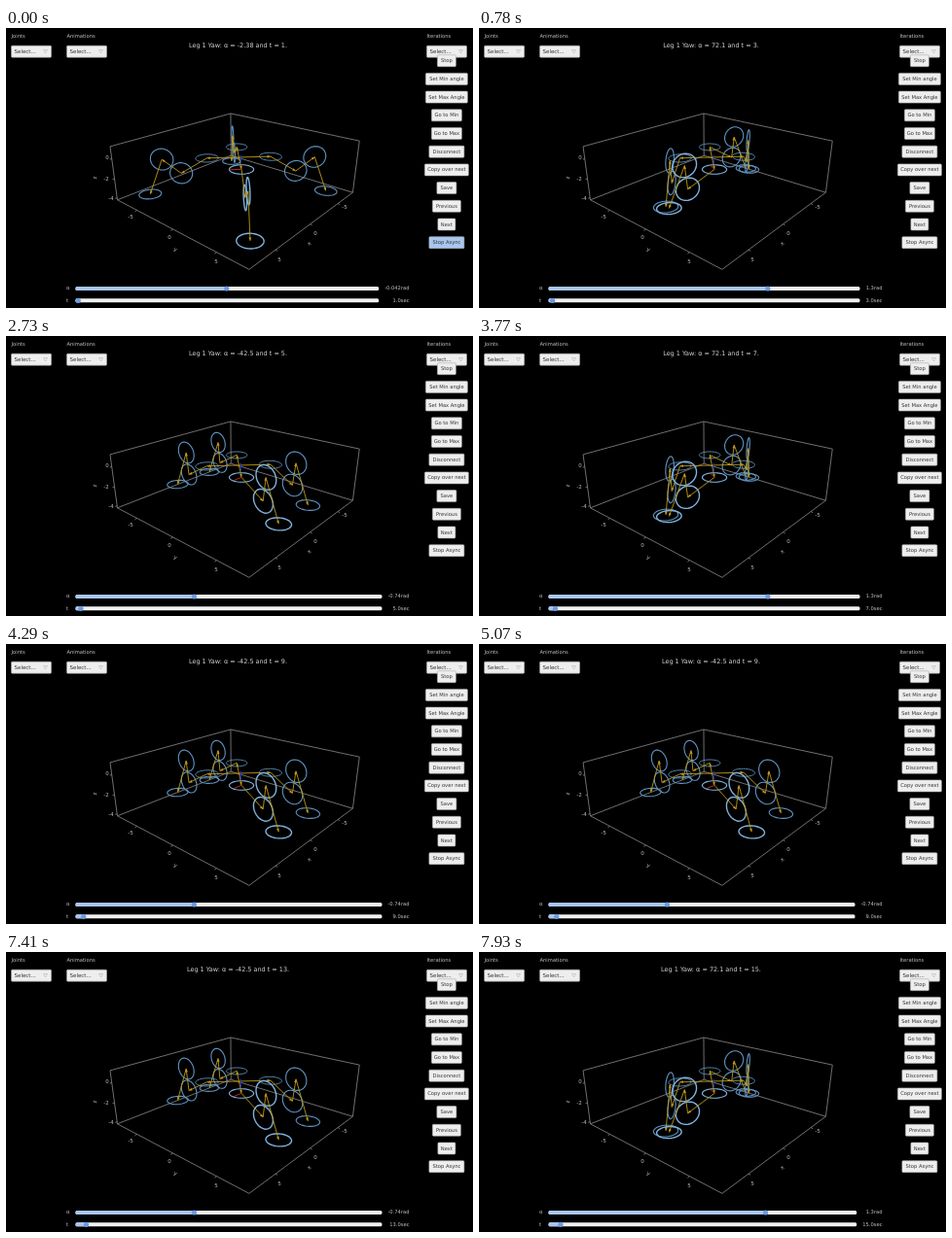
An HTML page with a canvas that plays this animation: 480x288 px, repeating every 8 s.

```html
<!DOCTYPE html>
<html>
<head>
<meta charset="utf-8">
<style>
html, body { margin: 0; width: 100%; height: 100%; overflow: hidden; background: #000; }
canvas { display: block; width: 480px; height: 288px; }
</style>
</head>
<body>
<canvas id="stage"></canvas>
<script>
const canvas = document.getElementById('stage');
const ctx = canvas.getContext('2d');
const ratio = window.devicePixelRatio || 1;
canvas.width = 480 * ratio;
canvas.height = 288 * ratio;
ctx.scale(ratio, ratio);

const LOOP = 8000, FIRST_STEP = 520, STEP = 1170;
const TILT = 0.0706, SIN_E = 0.382, COS_E = 0.924, NEAR = 0.321, ZOOM = 124.7;
const HALF_HEIGHT = 0.234, COXA_R = 0.26, RING = 0.092;
const BODY = [0.012, -0.012, 0.113];
const GOLD = '#bf9a1c', BOX_LINE = '#8c8c8c';

// Joints as [distance from the coxa, height]: hip, knee, foot.
const STRETCHED = [[0.215, -0.018], [0.365, 0.105], [0.485, -0.205]];
const FOLDED = [[0.215, -0.015], [0.235, 0.178], [0.365, -0.145]];
const POSES = {
  start: { yaw: -2.38, rad: '-0.042', joints: STRETCHED },
  back: { yaw: -42.5, rad: '-0.74', joints: FOLDED },
  ahead: { yaw: 72.1, rad: '1.3', joints: FOLDED }
};
const SIDE = { width: 1.1, color: '#6094c2' };
const LEGS = [
  { base: -Math.PI / 2, turn: 1, ...SIDE },
  { base: Math.PI, turn: -1, ...SIDE },
  { base: 0, turn: -1, ...SIDE },
  { base: Math.PI / 2, turn: 1, width: 1.4, color: '#80b2dd' }
];
const BUTTONS = [
  ['Stop', 19], ['Set Min angle', 43], ['Set Max Angle', 43], ['Go to Min', 31],
  ['Go to Max', 31], ['Disconnect', 36], ['Copy over next', 45], ['Save', 20],
  ['Previous', 29], ['Next', 18], ['Stop Async', 36]
];

// u runs to the right, d towards the viewer, z up.
function project([u, d, z]) {
  const k = ZOOM / (1 - NEAR * (d * COS_E + z * SIN_E));
  return [237.9 + u * k, 146.7 - (z * COS_E - d * SIN_E) * k];
}

function polar(angle, r, z, from = [0, 0, 0]) {
  return [from[0] + r * Math.cos(angle), from[1] + r * Math.sin(angle), z];
}

function mix(a, b, f) {
  return a.map((v, i) => v + (b[i] - v) * f);
}

function path(points, color, width, closed) {
  ctx.beginPath();
  points.forEach(p => ctx.lineTo(...project(p)));
  if (closed) ctx.closePath();
  ctx.strokeStyle = color;
  ctx.lineWidth = width;
  ctx.stroke();
}

function text(str, x, y, size = 5.2, color = '#c4c4c4', align = 'left', turn = 0) {
  ctx.save();
  ctx.translate(x, y);
  ctx.rotate(turn);
  ctx.font = size + 'px "DejaVu Sans", sans-serif';
  ctx.textAlign = align;
  ctx.textBaseline = 'middle';
  ctx.fillStyle = color;
  ctx.fillText(str, 0, 0);
  ctx.restore();
}

function arrow(a, b) {
  path([a, b], GOLD, 0.9);
  const [x0, y0] = project(a), [x1, y1] = project(b);
  const dir = Math.atan2(y1 - y0, x1 - x0);
  ctx.beginPath();
  ctx.moveTo(x1, y1);
  for (const side of [-0.4, 0.4]) {
    ctx.lineTo(x1 - 3.6 * Math.cos(dir + side), y1 - 3.6 * Math.sin(dir + side));
  }
  ctx.fillStyle = GOLD;
  ctx.fill();
}

// A ring spanned by a horizontal direction and either its normal or the vertical.
function ring(center, angle, upright, color, width) {
  const points = [];
  for (let i = 0; i < 40; i++) {
    const a = i * Math.PI / 20;
    const p = RING * Math.cos(a), q = RING * Math.sin(a);
    const flat = polar(angle, p, center[2] + (upright ? q : 0), center);
    points.push(upright ? flat : polar(angle + Math.PI / 2, q, center[2], flat));
  }
  path(points, color, width, true);
}

function drawBox() {
  const corner = (i, z) => polar(Math.PI / 2 * i - TILT, 1, z * HALF_HEIGHT);
  const [right, front, left, back] = [0, 1, 2, 3].map(i => corner(i, -1));
  const [rightTop, , leftTop, backTop] = [0, 1, 2, 3].map(i => corner(i, 1));
  path([left, leftTop, backTop, rightTop, right], BOX_LINE, 0.8);
  path([left, back, right, front], BOX_LINE, 0.8, true);
  path([back, backTop], BOX_LINE, 0.8);

  const tick = (p, dx, dy) => {
    const [x, y] = project(p);
    ctx.beginPath();
    ctx.moveTo(x, y);
    ctx.lineTo(x + dx, y + dy);
    ctx.stroke();
  };
  for (const f of [0.193, 0.5, 0.807]) {
    tick(mix(left, front, f), -2, 1.5);
    tick(mix(right, front, f), 2, 1.2);
  }
  for (const f of [0.22, 0.59, 0.96]) tick(mix(leftTop, left, f), -2, 0.6);

  [['0', 104, 134], ['-2', 103, 155.5], ['-4', 108, 176],
    ['-5', 128, 195], ['0', 168, 216], ['5', 216, 241],
    ['-5', 348, 185], ['0', 318, 211.5], ['5', 281, 239]
  ].forEach(([s, x, y]) => text(s, x, y, 5.5, '#bbb', 'center'));
  text('z', 92, 154, 5.5, '#bbb', 'center', -Math.PI / 2);
  text('y', 174, 228, 5.5, '#bbb', 'center', 0.48);
  text('x', 312, 222, 5.5, '#bbb', 'center', -0.65);
}

function drawRobot(pose) {
  const height = BODY[2];
  for (const leg of LEGS) {
    const out = leg.base - TILT;
    const angle = out + leg.turn * pose.yaw * Math.PI / 180;
    const coxa = polar(out, COXA_R, height, BODY);
    const joints = pose.joints.map(([r, z]) => polar(angle, r, z, coxa));
    const chain = [coxa, ...joints];
    chain.forEach((p, i) =>
      ring(p, angle, i === 1 || i === 2, leg.color, i ? leg.width : leg.width * 0.8));
    arrow(BODY, coxa);
    joints.forEach((p, i) => arrow(chain[i], p));
    if (leg.base === Math.PI / 2) {
      path([coxa, polar(angle + Math.PI / 2, 0.09, height, coxa)], '#b82c26', 1);
    }
  }
  path([[0.027, 0, height - 0.05], [0.027, 0, height + 0.025]], '#2438d0', 1);
}

function drawButton(label, x, y, w, fill = '#eee') {
  ctx.fillStyle = fill;
  ctx.strokeStyle = '#aaa';
  ctx.lineWidth = 0.6;
  ctx.beginPath();
  ctx.roundRect(x, y, w, 12, 1);
  ctx.fill();
  ctx.stroke();
  text(label, x + w / 2, y + 6.2, 5.2, '#333', 'center');
}

function drawSelect(title, x) {
  text(title, x, 8.7);
  drawButton('', x, 18.2, 41);
  text('Select...', x + 3, 24.3, 5.5, '#333');
  ctx.beginPath();
  ctx.moveTo(x + 33, 22.5);
  ctx.lineTo(x + 37, 22.5);
  ctx.lineTo(x + 35, 26);
  ctx.closePath();
  ctx.strokeStyle = '#aaa';
  ctx.lineWidth = 0.5;
  ctx.stroke();
}

function drawSlider(label, value, y, end, share) {
  const knob = 73.5 + (end - 72.5) * share;
  const bar = (x, w, color) => {
    ctx.fillStyle = color;
    ctx.beginPath();
    ctx.roundRect(x, y - 2, w, 4, 1.5);
    ctx.fill();
  };
  text(label, 62, y);
  bar(71.5, end - 71.5, '#f0f0f0');
  bar(71.5, knob - 71.5, '#a9c6f0');
  ctx.fillStyle = '#6c9be0';
  ctx.beginPath();
  ctx.arc(knob, y, 2.6, 0, 7);
  ctx.fill();
  text(value, 414.5, y, 5.2, undefined, 'right');
}

function draw(time) {
  const step = Math.max(0, Math.floor((time - FIRST_STEP) / STEP) + 1);
  const seconds = 1 + 2 * step;
  const pose = step === 0 ? POSES.start : step % 2 ? POSES.ahead : POSES.back;

  ctx.fillStyle = '#000';
  ctx.fillRect(0, 0, 480, 288);
  text(`Leg 1 Yaw: α = ${pose.yaw} and t = ${seconds}.`, 238.5, 18.1, 6.48, '#d4d4d4', 'center');
  drawSelect('Joints', 5.5);
  drawSelect('Animations', 62.5);
  drawSelect('Iterations', 432.5);
  BUTTONS.forEach(([label, w], i) => {
    const active = label === 'Stop Async' && step === 0;
    drawButton(label, 452.9 - w / 2, 27.7 + 18.7 * i, w, active ? '#a9c6f0' : undefined);
  });
  drawBox();
  drawRobot(pose);

  const values = [pose.rad + 'rad', seconds.toFixed(1) + 'sec'];
  ctx.font = '5.2px "DejaVu Sans", sans-serif';
  const end = 408.5 - Math.max(...values.map(v => ctx.measureText(v).width));
  drawSlider('α', values[0], 268, end, 0.5 + pose.yaw / 360);
  drawSlider('t', values[1], 280.3, end, seconds * 0.0022);
}

const begin = performance.now();
function tick() {
  draw((performance.now() - begin) % LOOP);
  requestAnimationFrame(tick);
}
tick();
</script>
</body>
</html>
```
